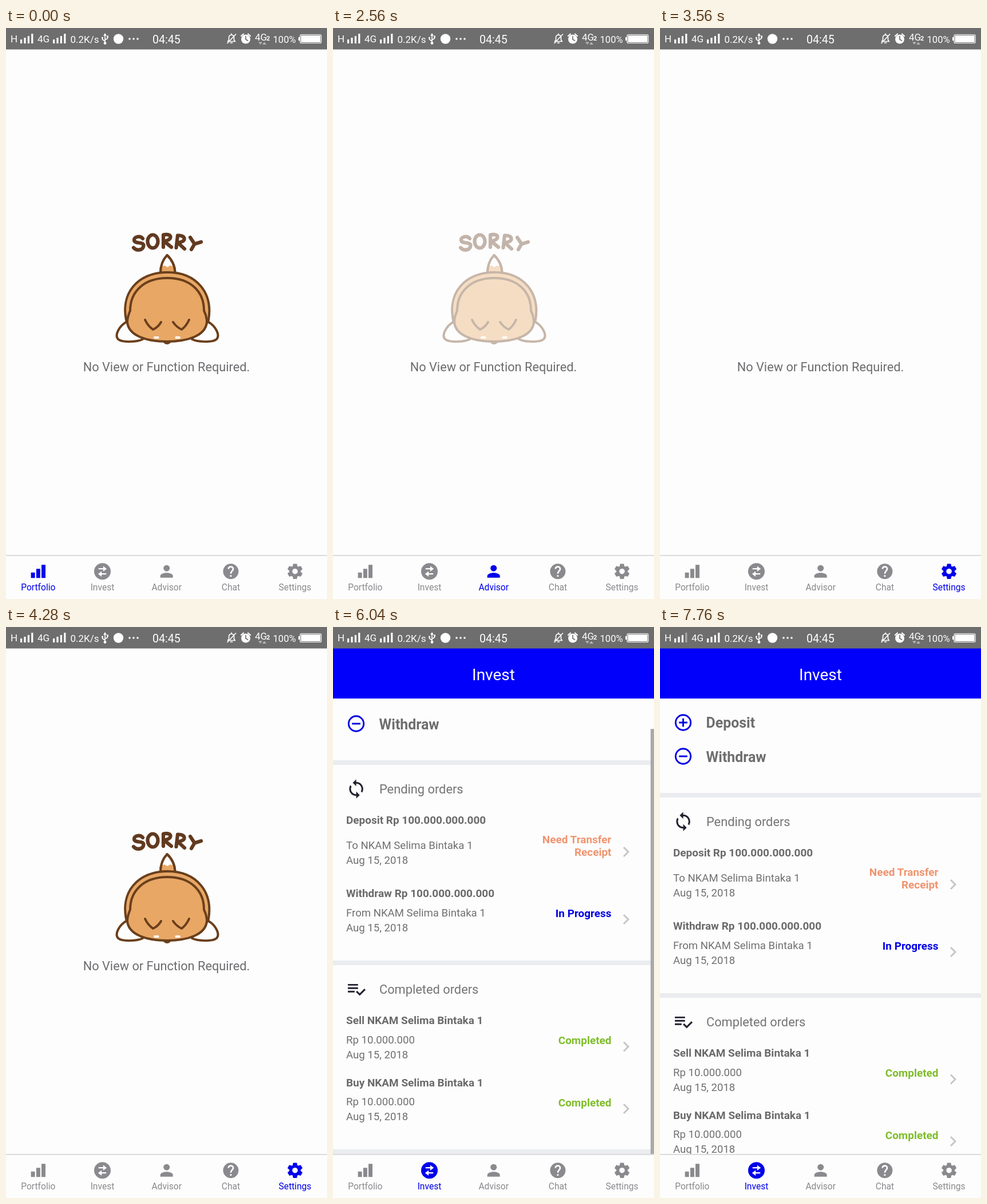
Recreate the animation shown at these times as an HTML page. Size 561 by 998 pixels, loop 8000 ms.

```html
<!DOCTYPE html>
<html lang="en">
<head>
<meta charset="utf-8">
<title>Invest app tabs</title>
<style>
  html, body { margin: 0; width: 100%; height: 100%; overflow: hidden; background: #fdfdfd; }
  svg { display: block; width: 100vw; height: 100vh; font-family: Roboto, sans-serif; }
  .status { fill: #fff; font-size: 17px; }
  .h1 { font-size: 24.9px; font-weight: 700; fill: #6e6e6e; }
  .h2 { font-size: 21.8px; fill: #747474; }
  .b { font-size: 18.95px; font-weight: 700; fill: #6a6a6a; }
  .p { font-size: 18.6px; fill: #707070; }
  .state { font-size: 18.95px; font-weight: 700; text-anchor: end; }
  .line { fill: none; stroke-linecap: round; stroke-linejoin: round; }
  .tab { color: #8a8a8e; fill: currentColor; font-size: 15.6px; text-anchor: middle; }
  .tab.on { color: #0000ea; }
</style>
</head>
<body>
<svg id="stage" viewBox="0 0 561 998" preserveAspectRatio="none"></svg>
<script>
const FUND = 'NKAM Selima Bintaka 1';
const BLUE = '#0000e6', GREEN = '#7fbd2b', ORANGE = '#f0946f';
const LOOP = 8000, STEP = 40, MAX_SCROLL = 57;

const text = (x, y, cls, s, more = '') => `<text x="${x}" y="${y}" class="${cls}" ${more}>${s}</text>`;
const rect = (x, y, w, h, fill, more = '') => `<rect x="${x}" y="${y}" width="${w}" height="${h}" fill="${fill}" ${more}/>`;
const bars = (x, id) => [7, 10, 13, 17].map((h, i) =>
  rect(x + i * 6.4, 27 - h, 3.2, h, '#fff', `id="${id}${i}"`)).join('');

function statusBar() {
  return rect(0, 0, 561, 37.5, '#6e6e6e') + `<g class="status">` +
    text(8, 25, '', 'H') + bars(25, 'h') + text(55, 25, '', '4G') + bars(82, 'g') +
    text(112.5, 25.5, '', '0.2K/s') +
    `<g class="line" stroke="#fff" stroke-width="1.6">
      <path d="M173 13V26M173 23L168.500 20V17M173 21L177.500 18V15"/></g>
    <path d="M173 9l3 4.500h-6z"/><circle cx="173" cy="26.500" r="2.400"/>
    <circle cx="168.500" cy="17" r="1.600"/><rect x="176" y="13.500" width="3" height="3"/>
    <circle cx="196.500" cy="19" r="8.700"/>` +
    [216, 223, 230].map(x => `<circle cx="${x}" cy="19" r="1.800"/>`).join('') +
    text(256, 26.500, '', '04:45', 'font-size="19.600" style="font-size:19.600px"') +
    `<g class="line" stroke="#fff" stroke-width="1.700">
      <path d="M387.500 23.500H400.500L398.500 21V17Q398.500 12.500 394 12Q389.500 12.500 389.500 17V21ZM394 10V12M392.500 26H395.500M387 26.500L401.500 11"/>
      <path d="M411 14L415 10.500M427 14L423 10.500" stroke-width="2.200"/></g>
    <circle cx="419" cy="19.500" r="8"/>
    <path class="line" d="M419 14.500V20L422.500 22" stroke="#6e6e6e" stroke-width="1.700"/>` +
    text(435, 22, '', '4G') + text(455, 21.500, '', '2', 'style="font-size:11px;font-weight:700"') +
    `<path d="M441 24.500h7l-3.500 4.500zM448 29h7l-3.500 -4.500z" fill="#b5b5b5"/>` +
    text(466.500, 25.500, '', '100%', 'style="font-size:16.600px"') +
    `<rect x="514" y="11.500" width="37" height="15" rx="2.500" fill="none" stroke="#fff" stroke-width="1.200"/>
    <rect x="515.500" y="13" width="34" height="12" rx="1"/><rect x="511" y="16" width="2.500" height="6"/></g>`;
}

function dog() {
  const half = `<path d="M210 514C198 521 189 537 196 544C203 550 229 549 239 544L225 520Z" fill="#fefefe"/>
    <path d="M243 510Q248 521 257 527Q266 523 271 514" fill="none"/>`;
  const spot = x => `<rect x="${x}" y="539" width="9.500" height="4" rx="2" fill="#fff"/>`;
  return `<g id="dog">
    <g class="line" stroke="#613a20" stroke-width="6.200">
      <path d="M239 368C234 362 223 365 224 371C225 378 240 373 240.500 380C240 389 228 390 223 384"/>
      <ellipse cx="256.500" cy="373" rx="9" ry="11.500"/>
      <path d="M275 383V361.500C291 358 292 371 276 372.500L289 383"/>
      <path d="M297.500 384L300 362.500C316 362 315 375 300 375L312 386"/>
      <path d="M322 366L329.500 377.500L341 374M329.500 377.500L324 387"/>
    </g>
    <g stroke="#6a3f1c" stroke-width="4" stroke-linecap="round" stroke-linejoin="round" fill="#e8a765">
      <path d="M270 428C270 415 275 404 281.500 397C289 404 295 415 295.500 428Z" fill="#fefefe"/>
      <path d="M271 418L277 415L282 418L287 415L294 418L295 428H270Z" stroke="none"/>
      <path d="M270 428C270 415 275 404 281.500 397C289 404 295 415 295.500 428" fill="none"/>
      <path d="M211 515C198 463 231 427 282 427C333 427 364 463 353 515Z"/>
      ${half}<g transform="matrix(-1 0 0 1 564 0)">${half}</g>
      <path d="M277 549Q281.500 553 286 549Z" fill="#6a3f1c"/>
      <path d="M217 494C217 460 242 437 282 437C322 437 346 460 346 494C350 502 351 508 351 514C349 538 317 548 281.500 548C246 548 214 538 212 514C212 507 214 501 217 494Z"/>
      <g fill="none"><path d="M243 510Q248 521 257 527Q266 523 271 514M320 510Q315 521 307 527Q298 523 292 514"/></g>
    </g>${spot(258)}${spot(295.500)}</g>`;
}

const chevron = y => `<path d="M508 ${y - 8}l8 8l-8 8" fill="none" stroke="#c6c6c6" stroke-width="3"/>`;
const band = y => rect(0, y, 561, 8, '#eaecef');
const ring = (y, plus) => `<g fill="none" stroke="${BLUE}" stroke-width="2.900">
  <circle cx="40.500" cy="${y}" r="13.200"/><path d="M33.200 ${y}h14.600${plus ? `M40.500 ${y - 7.300}v14.600` : ''}"/></g>`;

// One order: title, two detail lines, status lines and a chevron
function order(title, y, lines, first, states, color, stateY, arrowY) {
  return text(23, y, 'b', title) +
    lines.map((s, i) => text(23, first + i * 26, 'p', s)).join('') +
    states.map((s, i) => text(486.500, stateY + i * 22, 'state', s, `fill="${color}"`)).join('') + chevron(arrowY);
}

function invest() {
  const date = 'Aug 15, 2018', small = 'Rp 10.000.000', big = 'Rp 100.000.000.000';
  return `<g id="invest"><g id="list">` +
    ring(167, true) + text(80.500, 176, 'h1', 'Deposit') +
    ring(226, false) + text(80.500, 235.500, 'h1', 'Withdraw') + band(290) +
    `<path fill="#222230" transform="translate(22.200 321.600) scale(1.530)" d="M12 4V1L8 5l4 4V6c3.310 0 6 2.690 6 6 0 1-.25 1.970-.7 2.800l1.460 1.460C19.540 15 20 13.600 20 12c0-4.420-3.580-8-8-8zm0 14c-3.310 0-6-2.690-6-6 0-1 .25-1.970.7-2.800L5.240 7.740C4.460 9 4 10.400 4 12c0 4.420 3.580 8 8 8v3l4-4-4-4z"/>` +
    text(81, 348, 'h2', 'Pending orders') +
    order('Deposit ' + big, 401, ['To ' + FUND, date], 444.500, ['Need Transfer', 'Receipt'], ORANGE, 434.500, 450) +
    order('Withdraw ' + big, 529, ['From ' + FUND, date], 562.500, ['In Progress'], BLUE, 564, 568) +
    band(640) +
    `<path fill="#222230" transform="translate(23 672) scale(1.480)" d="M14 10H2v2h12zM14 6H2v2h12zM2 16h8v-2H2zM21.500 11.500L23 13l-7 7-4.500-4.500L13 14l3 3z"/>` +
    text(81, 698, 'h2', 'Completed orders') +
    order('Sell ' + FUND, 751, [small, date], 784.500, ['Completed'], GREEN, 786, 790.500) +
    order('Buy ' + FUND, 859.500, [small, date], 893, ['Completed'], GREEN, 894.500, 899) +
    band(970) + `</g>` + rect(555, 125, 6, 743, '#a9a9a9', 'id="thumb"') +
    rect(0, 37, 561, 88, '#0000fb') +
    text(280.500, 93, '', 'Invest', 'fill="#fff" text-anchor="middle" font-size="28"') + `</g>`;
}

function tabs() {
  const arrow = '<path d="M-7.500 -6.300h9v-4l7 5.300l-7 5.300v-4h-9z"/>';
  const tooth = a => `<path transform="rotate(${a})" d="M-4.600 -7L-3.200 -13.300H3.200L4.600 -7Z"/>`;
  const icons = {
    Portfolio: '<path d="M-12.700 2h7v9.500h-7zM-3.400 -4.500h7v16h-7zM5.700 -11.500h7v23h-7z"/>',
    Invest: `<circle r="14.500"/><g fill="#fff" transform="scale(.9)">${arrow}<g transform="rotate(180)">${arrow}</g></g>`,
    Advisor: '<circle cy="-5.500" r="5.500"/><path d="M-11 11V8C-11 4 -4 2.500 0 2.500S11 4 11 8V11Z"/>',
    Chat: `<circle r="13.500"/><path d="M-4.100 -4.100C-4.100 -9.500 4.100 -9.500 4.100 -4.100C4.100 -1 0 -.5 0 4.100" fill="none" stroke="#fff" stroke-width="2.700"/>
      <rect x="-1.400" y="6.600" width="2.800" height="2.800" fill="#fff"/>`,
    Settings: '<circle r="7.300" fill="none" stroke="currentColor" stroke-width="5"/>' + [0, 60, 120, 180, 240, 300].map(tooth).join('')
  };
  return rect(0, 921, 561, 77, '#fdfdfd') + rect(0, 921.300, 561, 1.300, '#cbcbcb') +
    Object.entries(icons).map(([name, icon], i) => {
      const x = 56.300 + i * 112.200;
      return `<g class="tab"><g transform="translate(${x} 949.700)">${icon}</g>${text(x, 983, '', name)}</g>`;
    }).join('');
}

const stage = document.getElementById('stage');
stage.innerHTML = rect(0, 0, 561, 998, '#fdfdfd') +
  `<g id="empty">${dog()}${text(280.500, 600, '', 'No View or Function Required.', 'fill="#6c6c70" text-anchor="middle" font-size="21.750"')}</g>` +
  invest() + tabs() + statusBar() +
  `<circle id="touch" r="14.500" fill="#fff" fill-opacity=".55" stroke="#efcf86" stroke-width="1.600"/>`;

const el = id => document.getElementById(id);
const [dogEl, empty, investEl, list, thumb, touch, lastBar] =
  ['dog', 'empty', 'invest', 'list', 'thumb', 'touch', 'h3'].map(el);
const tabEls = [...document.querySelectorAll('.tab')];

// start time, tab index, image fade start
const VIEWS = [[0, 0, -300], [2440, 2, 2450], [2920, 3, 2950], [3560, 4, 3570], [4800, 1, 0]];
// from, to, x, y start, y end
const TOUCHES = [
  [2080, 2240, 280, 972, 972], [2640, 2800, 392, 968, 968], [3280, 3440, 505, 978, 978],
  [4120, 4280, 167.500, 966, 966], [6160, 6840, 73.500, 458, 527.500], [7560, 7760, 220.500, 437, 437]
];
const DRAG = TOUCHES[4];

const clamp = (v, a = 0, b = 1) => Math.min(b, Math.max(a, v));
const ease = u => u * u * (3 - 2 * u);
const touchY = ([from, , , y0, y1], t) => y0 + (y1 - y0) * ease(clamp((t - from) / 540));

function draw(t) {
  const [, tab, fade] = VIEWS.filter(v => v[0] <= t).pop();
  tabEls.forEach((g, i) => g.classList.toggle('on', i === tab));
  investEl.style.display = tab === 1 ? '' : 'none';
  empty.style.display = tab === 1 ? 'none' : '';
  dogEl.setAttribute('opacity', clamp((t - fade) / 300));

  const scroll = clamp(DRAG[4] - touchY(DRAG, t), 0, MAX_SCROLL);
  list.setAttribute('transform', `translate(0 ${-scroll})`);
  thumb.setAttribute('y', 125 + scroll * 743 / 796);
  thumb.setAttribute('opacity', clamp((7400 - t) / 250));
  lastBar.setAttribute('opacity', t < 7200 ? 1 : 0.4);

  const hit = TOUCHES.find(h => t >= h[0] && t < h[1]);
  touch.style.display = hit ? '' : 'none';
  if (hit) touch.setAttribute('transform', `translate(${hit[2]} ${touchY(hit, t)})`);
}

const start = performance.now();
function tick() {
  const t = (performance.now() - start) % LOOP;
  draw(Math.floor(t / STEP) * STEP);
  requestAnimationFrame(tick);
}
tick();
</script>
</body>
</html>
```
